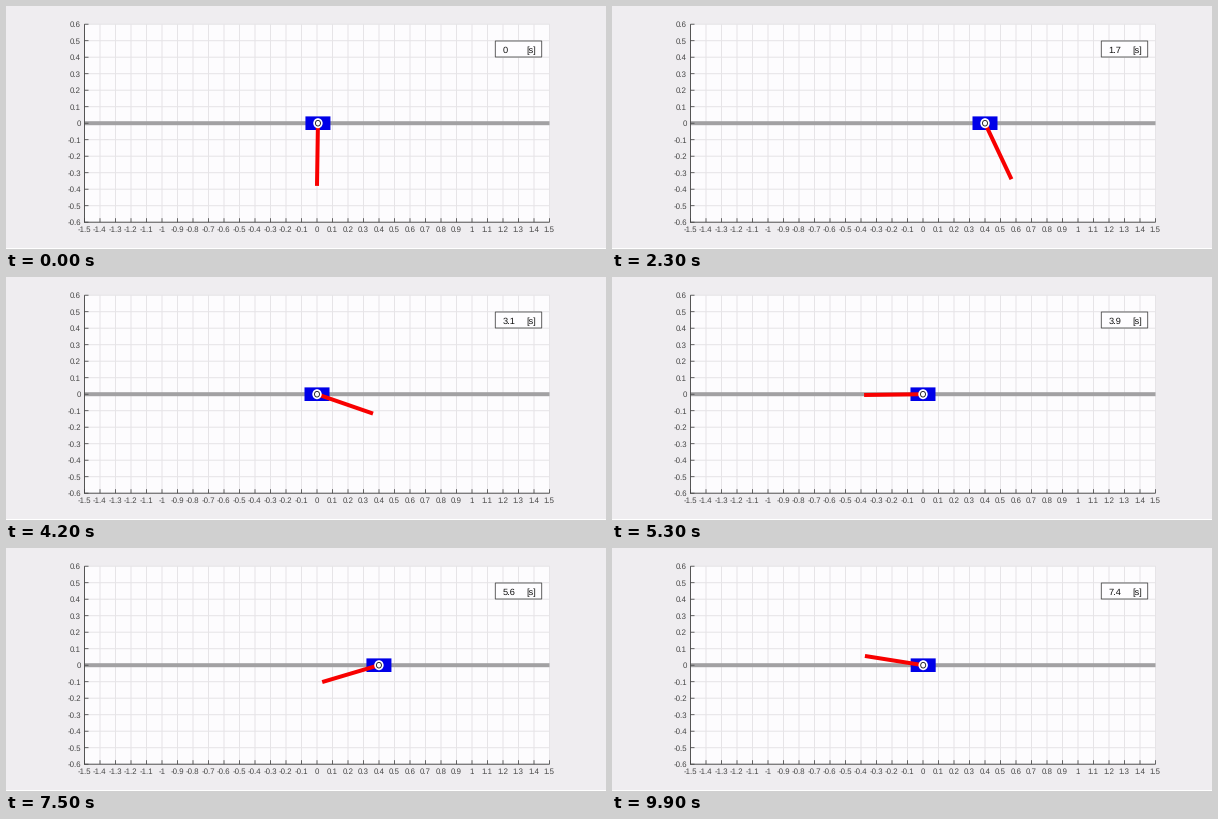
A matplotlib script for the animation above (10 s loop, 600 by 243 pixels).

```python
import numpy as np
import matplotlib.pyplot as plt
from matplotlib.animation import FuncAnimation
from matplotlib.patches import Ellipse, Rectangle

W, H, DPI = 600, 243, 64
PX = 72 / DPI                      # points per pixel
FRAMES, INTERVAL = 100, 100
SIM_STEP = 0.0744                  # simulated seconds per frame

X0, Y0, SX, SY = 311, 117.2, 155, 165
LEFT, RIGHT = X0 - 1.5 * SX, X0 + 1.5 * SX
TOP, BOTTOM = Y0 - 0.6 * SY, Y0 + 0.6 * SY
INK, GRID = "#454545", "#e6e4e7"

ROD, STROKE = 0.38, 0.4
ZETA, WN = 0.67, 6.6               # cart servo damping and frequency
OMEGA = 0.463                      # small-swing pendulum rate, rad per frame
SETTLE = 7                         # frames a cart step takes to change the swing

# Each cart step: start frame, then amplitude and one peak of the new swing
STEPS = [(-0.37, 70.5, 10.87), (27.03, -94.5, 35.76),
         (54.03, 110, 63.76), (80.5, -167, 93.49)]

plt.rcParams.update({"font.family": "Liberation Sans", "path.snap": False,
                     "text.hinting": "none"})


def free_swing(amplitude, peak):
    """Exact free pendulum motion as a function of the frame number."""
    k = np.sin(np.radians(amplitude) / 2)
    phase = np.linspace(-4 * np.pi, 4 * np.pi, 4001)
    time = np.cumsum(1 / np.sqrt(1 - (k * np.cos(phase)) ** 2))
    time = (time - time[2000]) * (phase[1] - phase[0]) / OMEGA + peak
    return lambda n: 2 * np.arcsin(k * np.cos(np.interp(n, time, phase)))


SWINGS = [free_swing(0, 0)] + [free_swing(a, p) for _, a, p in STEPS]


def pose(n):
    """Cart position and rod angle (from hanging, in radians)."""
    i = sum(start <= n for start, _, _ in STEPS)
    age = n - STEPS[i - 1][0]

    damp = np.sqrt(1 - ZETA ** 2)
    t = WN * age * SIM_STEP
    rest = np.exp(-ZETA * t) * (np.cos(damp * t)
                                + ZETA / damp * np.sin(damp * t))
    x = STROKE * (1 - rest if i % 2 else rest)

    mix = np.sin(np.pi / 2 * min(age / SETTLE, 1))
    return x, (1 - mix) * SWINGS[i - 1](n) + mix * SWINGS[i](n)


fig = plt.figure(figsize=(W / DPI, H / DPI), dpi=DPI, facecolor="#efedf0")
ax = fig.add_axes([0, 0, 1, 1])
ax.set_xlim(0, W)
ax.set_ylim(H, 0)
ax.axis("off")


def line(xs, ys, color, width, z):
    return ax.plot(xs, ys, color=color, lw=width * PX, zorder=z,
                   solid_capstyle="butt")[0]


def box(x, y, w, h, color, z, edge="none", lw=0):
    return ax.add_patch(Rectangle((x, y), w, h, fc=color, ec=edge,
                                  lw=lw * PX, zorder=z))


def label(x, y, text, size, ha, color=INK):
    return ax.text(x, y, text, size=size * PX, ha=ha, va="center_baseline",
                   color=color, zorder=9)


box(0, H - 1, W, 1, "white", 0)
box(LEFT, TOP, RIGHT - LEFT, BOTTOM - TOP, "#fdfcfe", 1)

for i in range(-15, 16):
    x = X0 + i / 10 * SX
    line([x, x], [TOP, BOTTOM], GRID, 1, 2)
    line([x, x], [BOTTOM - 4, BOTTOM], INK, 0.8, 4)
    label(x - 0.3, 223.3, f"{i / 10:g}", 7.9, "center")
for i in range(-6, 7):
    y = Y0 - i / 10 * SY
    line([LEFT, RIGHT], [y, y], GRID, 1, 2)
    line([LEFT, LEFT + 4], [y, y], INK, 0.8, 4)
    label(75, y + 0.3, f"{i / 10:g}", 7.9, "right")
line([LEFT, LEFT], [TOP, BOTTOM + 0.5], INK, 0.9, 4)
line([LEFT, RIGHT], [BOTTOM, BOTTOM], INK, 0.9, 4)

line([LEFT, RIGHT], [Y0, Y0], "#a2a1a3", 4, 3)

box(489.3, 35, 46.4, 16, "#fefdff", 8, "#505050", 0.9)
clock = label(496.4, 43.4, "0", 9.3, "left", "#111111")
label(520, 43.4, "[s]", 9.3, "left", "#111111")

cart = box(0, Y0 - 6.8, 25, 13.6, "#0000e8", 5)
rod = line([], [], "#f80000", 4, 6)
hub = ax.add_patch(Ellipse((X0, Y0), 9.4, 10, fc="white", ec="none", zorder=7))
ring = ax.add_patch(Ellipse((X0, Y0), 5, 5.6, fc="white", ec="#222222",
                            lw=0.9 * PX, zorder=7.5))


def update(n):
    x, th = pose(n)
    cx = X0 + SX * x
    cart.set_x(cx - 12.5)
    rod.set_data([cx, cx + SX * ROD * np.sin(th)],
                 [Y0, Y0 + SY * ROD * np.cos(th)])
    hub.center = ring.center = (cx, Y0)
    clock.set_text(f"{round(n * SIM_STEP, 1):g}")
    return cart, rod, hub, ring, clock


anim = FuncAnimation(fig, update, frames=FRAMES, interval=INTERVAL,
                     repeat=True, repeat_delay=0)
plt.show()
```
